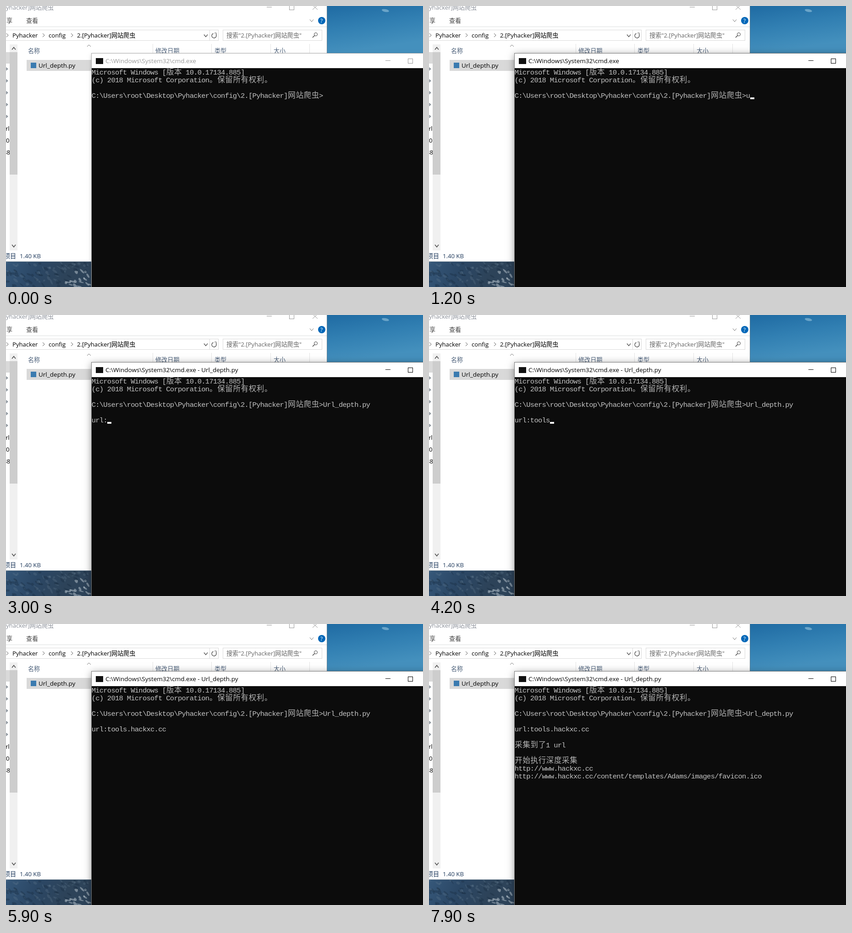
An HTML page with a canvas that plays this animation: 910x615 px, repeating every 8000 ms.

```html
<!DOCTYPE html>
<html lang="zh">
<head>
<meta charset="utf-8">
<style>
html, body { margin: 0; width: 100%; height: 100%; overflow: hidden; }
canvas { display: block; }
</style>
</head>
<body>
<canvas id="stage" width="910" height="615"></canvas>
<script>
const ctx = document.getElementById('stage').getContext('2d');
const LOOP = 8000;
const UI = '"Open Sans", "Noto Sans CJK SC", "Noto Sans CJK", sans-serif';
const MONO = '"Liberation Mono", monospace';
const CJK = '"Noto Sans CJK SC", "Noto Sans CJK", sans-serif';
const CELL = 8.56, ROW = 17.08, LEFT = 187, TOP = 136;

const FOLDER = '2.[Pyhacker]网站爬虫';
const PROMPT = `C:\\Users\\root\\Desktop\\Pyhacker\\config\\${FOLDER}>`;
const SCRIPT = 'Url_depth.py';
const ADDRESS = 'tools.hackxc.cc';

// [time, row, text] printed on the console
const prints = [
  [0, 0, 'Microsoft Windows [版本 10.0.17134.885]'],
  [0, 1, '(c) 2018 Microsoft Corporation。保留所有权利。'],
  [0, 3, PROMPT],
  [800, 3, PROMPT + 'u'],
  [1800, 3, PROMPT + SCRIPT],
  [2300, 5, 'url:'],
  [7200, 7, '采集到了1 url'],
  [7300, 9, '开始执行深度采集'],
  [7700, 10, 'http://www.hackxc.cc'],
  [7900, 11, 'http://www.hackxc.cc/content/templates/Adams/images/favicon.ico']
];

// [time, letters of the address typed, cursor shown]
const typing = [
  [3000, 0, 1], [3500, 1, 1], [3600, 2, 1], [3800, 3, 1], [4000, 4, 0], [4200, 5, 1],
  [4400, 6, 0], [4500, 6, 1], [4700, 8, 1], [4800, 9, 1], [5000, 10, 1], [5100, 11, 1],
  [5200, 12, 1], [5400, 13, 1], [5500, 14, 1], [5700, 15, 1], [5900, 15, 0]
];

// [from, to, row, column] of the cursor outside the address line
const cursors = [
  [100, 600, 3, 59], [1200, 1600, 3, 60], [1800, 2000, 3, 71],
  [2000, 2100, 4, 0], [6400, 6900, 6, 0]
];

function rect(x, y, w, h, color) {
  ctx.fillStyle = color;
  ctx.fillRect(x, y, w, h);
}

function frame(x, y, w, h, color) {
  ctx.strokeStyle = color;
  ctx.lineWidth = 1;
  ctx.strokeRect(x + .5, y + .5, w - 1, h - 1);
}

function path(points, color, width = 1) {
  ctx.beginPath();
  for (let i = 0; i < points.length; i += 2) ctx.lineTo(points[i], points[i + 1]);
  ctx.strokeStyle = color;
  ctx.lineWidth = width;
  ctx.stroke();
}

function chevron(x, y, dx, dy, color, width) {
  const shape = dx ? [-dx / 2, -4, dx / 2, 0, -dx / 2, 4] : [-4, -dy / 2, 0, dy / 2, 4, -dy / 2];
  path(shape.map((v, i) => v + (i % 2 ? y : x)), color, width);
}

function label(text, x, middle, color = '#000', size = 13.1) {
  ctx.font = `${size}px ${UI}`;
  ctx.textAlign = 'left';
  ctx.fillStyle = color;
  ctx.fillText(text, x, middle + 5);
}

function blob(x, y, rx, ry, angle, color) {
  ctx.beginPath();
  ctx.ellipse(x, y, rx, ry, angle, 0, 7);
  ctx.fillStyle = color;
  ctx.fill();
}

function gradient(x0, y0, x1, y1, ...colors) {
  const g = ctx.createLinearGradient(x0, y0, x1, y1);
  colors.forEach((c, i) => g.addColorStop(i / (colors.length - 1), c));
  return g;
}

function wallpaper() {
  rect(700, 0, 210, 104, gradient(700, 0, 715, 104, '#1f6ba3', '#317fb2', '#4490bd'));
  blob(828, 10, 8, 3, .2, 'rgba(150,195,220,.6)');
  rect(0, 559, 188, 56, gradient(0, 559, 120, 615, '#36587a', '#2b4765', '#2d4359'));
  let seed = 11;
  const random = () => (seed = seed * 16807 % 2147483647) / 2147483647;
  for (let i = 0; i < 110; i++) {
    const x = random() * 188, y = 560 + random() * 55;
    const snowy = x > 130 && y > 580 && x + y > 735;
    const tone = snowy ? '205,214,222,.45' : i % 2 ? '24,42,64,.35' : '105,128,148,.25';
    blob(x, y, 2 + random() * 5, 1 + random() * 2, random() * 1.2, `rgba(${tone})`);
  }
}

function captionButtons(x, y, step, color) {
  rect(x - 5, y, 11, 1, color);
  frame(x + step - 6, y - 4, 11, 11, color);
}

function explorer() {
  rect(0, 0, 700, 559, '#fff');
  rect(700, 0, 1, 560, '#6d8798');
  rect(0, 559, 188, 1, '#6d8090');
  label(FOLDER.slice(4), 0, 3, '#8a8f98');
  captionButtons(574, 2, 50, '#999');
  path([669, -2, 680, 8], '#999');
  path([680, -2, 669, 8], '#999');

  label('享', 1, 32, '#444');
  label('查看', 44, 32, '#444');
  chevron(667, 32, 0, 5, '#777');
  blob(689, 32, 8, 8, 0, '#0067b8');
  label('?', 686, 32, '#fff', 12);
  rect(0, 45, 700, 1, '#dcdddf');

  rect(0, 52, 463, 1, '#d9d9d9');
  rect(0, 75, 463, 1, '#d9d9d9');
  rect(444, 52, 1, 24, '#d9d9d9');
  rect(463, 52, 1, 24, '#d9d9d9');
  for (const x of [3, 82, 144]) chevron(x, 64, 4, 0, '#555');
  label('Pyhacker', 14, 64);
  label('config', 93, 64);
  label(FOLDER, 155, 64);
  chevron(436, 65, 0, 5, '#555', 1.4);
  ctx.beginPath();
  ctx.arc(454, 65, 5, -.6, 4.4);
  ctx.strokeStyle = '#555';
  ctx.lineWidth = 1.4;
  ctx.stroke();
  path([455, 59, 459, 59, 459, 63], '#555');
  frame(473, 52, 217, 24, '#d9d9d9');
  label(`搜索"${FOLDER}"`, 481, 64, '#666');
  ctx.beginPath();
  ctx.arc(676, 62, 3.5, 0, 7);
  ctx.strokeStyle = '#444';
  ctx.stroke();
  path([673.5, 64.5, 669, 69], '#444', 1.5);

  rect(0, 101, 8, 25, '#d9d9d9');
  for (let y = 138; y < 250; y += 26) {
    path([0, y - 3, 4, y + 1], '#8a929a', 2);
    path([3, y - 2, 0, y + 3], '#8a929a', 2);
  }
  ctx.save();
  ctx.beginPath();
  ctx.rect(0, 255, 8, 80);
  ctx.clip();
  label('rl', -1, 268);
  label('0', 0, 294);
  label('88', -6, 320);
  ctx.restore();
  rect(8, 84, 17, 451, '#f0f0f0');
  rect(8, 101, 17, 268, '#cdcdcd');
  chevron(17, 93, 0, -5, '#505050', 1.6);
  chevron(17, 525, 0, 5, '#505050', 1.6);

  const heads = [['名称', 48], ['修改日期', 326], ['类型', 455], ['大小', 584]];
  for (const [text, x] of heads) label(text, x, 98, '#4c607a');
  for (const x of [320, 448, 577, 662]) rect(x, 83, 1, 21, '#e3e3e3');
  chevron(181, 87, 0, -4, '#777');
  rect(45, 118, 143, 24, '#d9d9d9');
  rect(54, 124, 12, 12, '#3b7bb0');
  label(SCRIPT, 71, 130, '#000', 13.5);
  label('项目', -4, 547, '#1e395b');
  label('1.40 KB', 30, 547, '#1e395b');
}

function consoleLine(text, row) {
  let col = 0;
  ctx.textAlign = 'center';
  for (const ch of text) {
    const wide = ch.charCodeAt(0) > 255;
    const span = wide ? 2 : 1;
    ctx.font = wide ? `16.5px ${CJK}` : `15.5px ${MONO}`;
    ctx.fillStyle = wide ? '#b2b2b2' : '#c4c4c4';
    ctx.fillText(ch, LEFT + (col + span / 2) * CELL, TOP + row * ROW + 14);
    col += span;
  }
}

function cursor(row, col) {
  rect(Math.round(LEFT + col * CELL), Math.round(TOP + (row + 1) * ROW) - 4, 9, 4, '#f2f2f2');
}

function terminal(t) {
  const active = t >= 100;
  const ink = active ? '#000' : '#999';
  const edge = active ? '#777' : '#aaa';
  ctx.save();
  ctx.shadowColor = `rgba(0,0,0,${active ? .45 : .25})`;
  ctx.shadowBlur = active ? 16 : 8;
  ctx.shadowOffsetY = 3;
  rect(187, 104, 740, 530, '#fff');
  ctx.restore();
  rect(186, 103, 724, 1, edge);
  rect(186, 103, 1, 512, edge);
  rect(196, 114, 16, 13, '#111');
  const title = 'C:\\Windows\\System32\\cmd.exe' + (t >= 2100 ? ' - ' + SCRIPT : '');
  label(title, 217, 120, ink, 13.5);
  captionButtons(833, 119, 50, ink);
  rect(187, 136, 723, 479, '#0c0c0c');

  // Inline input-method cell
  if (t >= 800 && t < 1200) rect(692, 187, 9, 18, '#0037da');

  const lines = [];
  for (const [time, row, text] of prints) if (t >= time) lines[row] = text;
  const [, typed, shown] = typing.filter(s => t >= s[0]).pop() || [0, 0, 0];
  if (typed) lines[5] += ADDRESS.slice(0, typed);
  lines.forEach(consoleLine);
  if (shown) cursor(5, 4 + typed);
  for (const [from, to, row, col] of cursors) if (t >= from && t < to) cursor(row, col);
}

const start = performance.now();
function draw() {
  wallpaper();
  explorer();
  terminal((performance.now() - start) % LOOP);
  requestAnimationFrame(draw);
}
draw();
</script>
</body>
</html>
```
